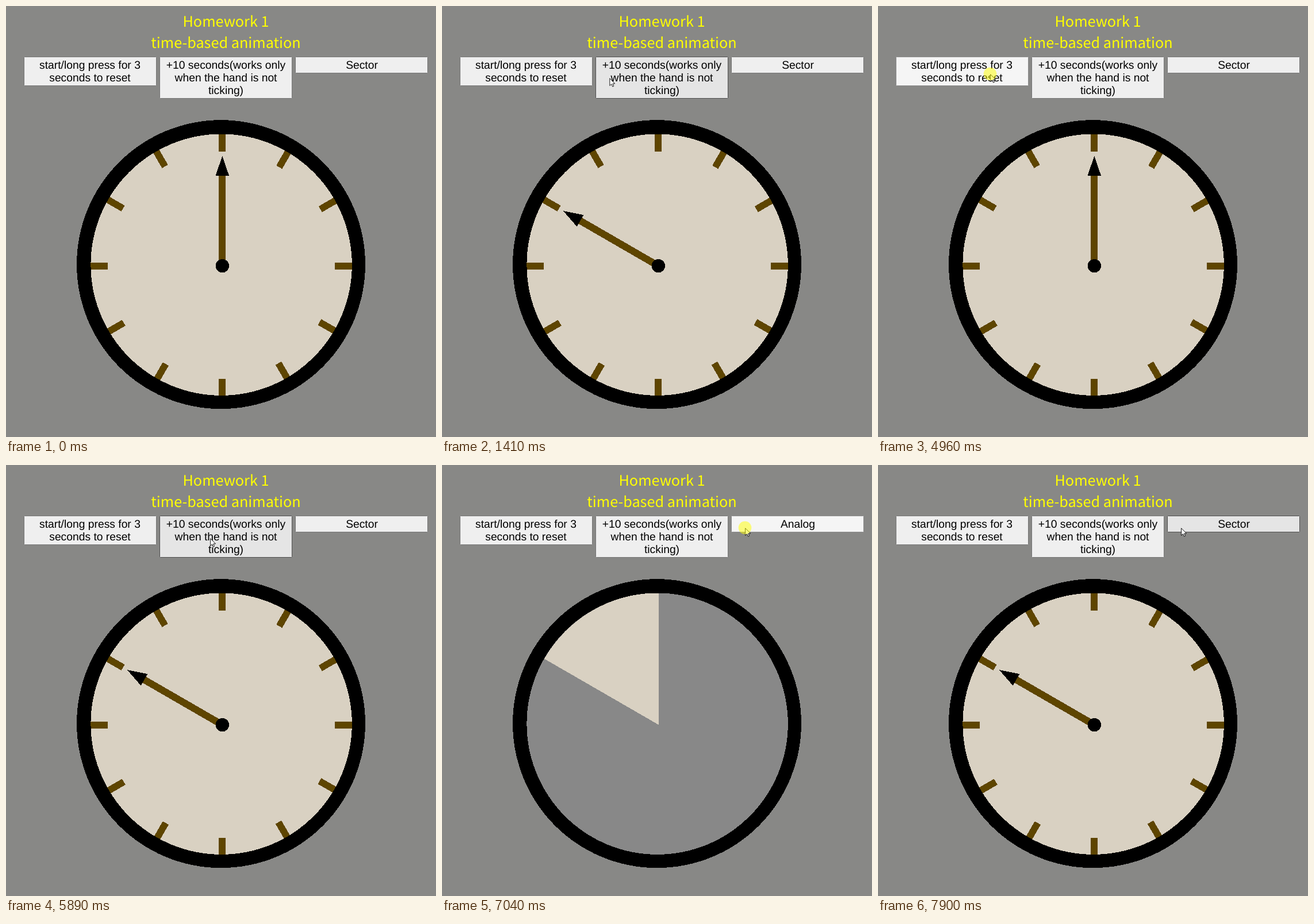
An HTML page that plays this animation: 748 px wide and 749 px high, repeating every 8000 ms.

```html
<!DOCTYPE html>
<html lang="en">
<head>
<meta charset="utf-8">
<title>Time-based animation</title>
<style>
html, body { margin: 0; width: 100%; height: 100%; overflow: hidden; background: #888886; }
svg { display: block; width: 748px; height: 749px; }
text { text-anchor: middle; text-rendering: geometricPrecision; }
.title { font: 25.25px "Noto Sans CJK SC", "Noto Sans CJK JP", "Noto Sans CJK", "Noto Sans", sans-serif; fill: #ff0; }
.label { font: 19.3px "Liberation Sans", Arial, sans-serif; fill: #000; }
.clock { shape-rendering: crispEdges; }
</style>
</head>
<body>
<svg viewBox="0 0 748 749">
  <rect width="748" height="749" fill="#888886"/>
  <text class="title" x="382.5" y="36">Homework 1</text>
  <text class="title" x="382.5" y="72.7">time-based animation</text>
  <g id="buttons"></g>
  <g class="clock">
    <circle id="face" cx="374.5" cy="449.5" r="235"/>
    <g id="analog">
      <path id="ticks" stroke="#5e4500" stroke-width="11.8"/>
      <g id="hand">
        <rect x="370.2" y="292" width="12.2" height="159" fill="#5e4500"/>
        <path d="M376.3 260.5L388 294.8H364.6Z"/>
      </g>
      <circle cx="376.3" cy="451.6" r="11.7"/>
    </g>
    <path id="sector" d="M376.5 451.3V222A229 229 0 0 0 178 336.8Z" fill="#d9d1c2"/>
    <path fill-rule="evenodd" d="M123 449.2a251 251 0 0 0 502 0a251 251 0 0 0 -502 0Z
      M147.4 449.7a227.2 227.2 0 0 0 454.4 0a227.2 227.2 0 0 0 -454.4 0Z"/>
  </g>
  <g id="cursor">
    <path transform="translate(.6 .8)" d="M0 0V12.6L3 9.9L4.9 14.3L7 13.4L5.1 9.2H9Z" fill="#fff" stroke="#000" stroke-width=".9"/>
    <circle id="press" r="11.3" fill="#ff0" fill-opacity=".5"/>
  </g>
</svg>
<script>
const LOOP = 8000;
const TOP = 88.5, WIDTH = 230, LINE = 21.8;
const PIVOT = { x: 376.3, y: 451.6 };
const $ = id => document.getElementById(id);
const show = (el, on) => el.setAttribute("display", on ? "inline" : "none");
const within = (t, from, to) => t >= from && t < to;

function add(parent, tag, attrs, text = "") {
  const el = document.createElementNS("http://www.w3.org/2000/svg", tag);
  for (const k in attrs) el.setAttribute(k, attrs[k]);
  el.textContent = text;
  return parent.appendChild(el);
}

const buttons = [
  ["start/long press for 3", "seconds to reset"],
  ["+10 seconds(works only", "when the hand is not", "ticking)"],
  ["Sector"]
].map((lines, i) => {
  const x = 31.5 + 236 * i, h = 6 + 22 * lines.length;
  const box = add($("buttons"), "rect", { x, y: TOP, width: WIDTH, height: h, rx: 1 });
  const texts = lines.map((line, n) => add($("buttons"), "text",
    { class: "label", x: 146 + 236.5 * i, y: 109.3 + n * LINE }, line));
  return { x, h, box, texts };
});

// The tick circle sits slightly up and left of the hand's pivot.
function tickPath(i) {
  const a = i * Math.PI / 6, dx = Math.sin(a), dy = -Math.cos(a);
  const r = 197.4 - 1.5 * (dx + dy);
  const at = d => `${PIVOT.x + d * dx} ${PIVOT.y + d * dy}`;
  return `M${at(r)}L${at(r + 34)}`;
}
$("ticks").setAttribute("d", Array.from({ length: 12 }, (_, i) => tickPath(i)).join(""));

const enter = { x: 687, y: 688 };
const moves = [
  { from: 250, to: 950, x: 360, y: 130 },
  { from: 1360, to: 1670, x: 195, y: 118 },
  { from: 5300, to: 5530, x: 355, y: 127 },
  { from: 5960, to: 6160, x: 508, y: 114 },
  { from: 6260, to: 6470, x: 527, y: 109 }
];
const presses = [[1010, 1060], [1970, 5320], [5840, 5890], [6530, 6580], [7040, 7140], [7800, 7900]];

const easeOut = k => 1 - (1 - k) ** 3;

function cursorAt(t) {
  let { x, y } = enter;
  for (const m of moves) {
    const k = easeOut(Math.min(1, Math.max(0, (t - m.from) / (m.to - m.from))));
    x += (m.x - x) * k;
    y += (m.y - y) * k;
  }
  return { x, y };
}

function draw(t) {
  const { x, y } = cursorAt(t);
  const visible = t >= moves[0].from;
  const pressed = presses.some(p => within(t, ...p));
  const sector = within(t, 6580, 7140);
  const turned = within(t, 1060, 4960) || t >= 5890;

  show($("cursor"), visible);
  show($("press"), pressed);
  $("cursor").setAttribute("transform", `translate(${x} ${y})`);

  for (const b of buttons) {
    const over = visible && within(x, b.x, b.x + WIDTH) && within(y, TOP, TOP + b.h);
    const [fill, edge] = !over ? ["#efefef", "#767676"]
      : pressed ? ["#f5f5f5", "#8d8d8d"] : ["#e5e5e5", "#4f4f4f"];
    b.box.setAttribute("fill", fill);
    b.box.setAttribute("stroke", edge);
  }
  buttons[2].texts[0].textContent = sector ? "Analog" : "Sector";

  $("face").setAttribute("fill", sector ? "#888" : "#d9d1c2");
  show($("analog"), !sector);
  show($("sector"), sector);
  $("hand").setAttribute("transform", `rotate(${turned ? -60 : 0} ${PIVOT.x} ${PIVOT.y})`);
}

const start = performance.now();
function tick() {
  draw((performance.now() - start) % LOOP);
  requestAnimationFrame(tick);
}
tick();
</script>
</body>
</html>
```
